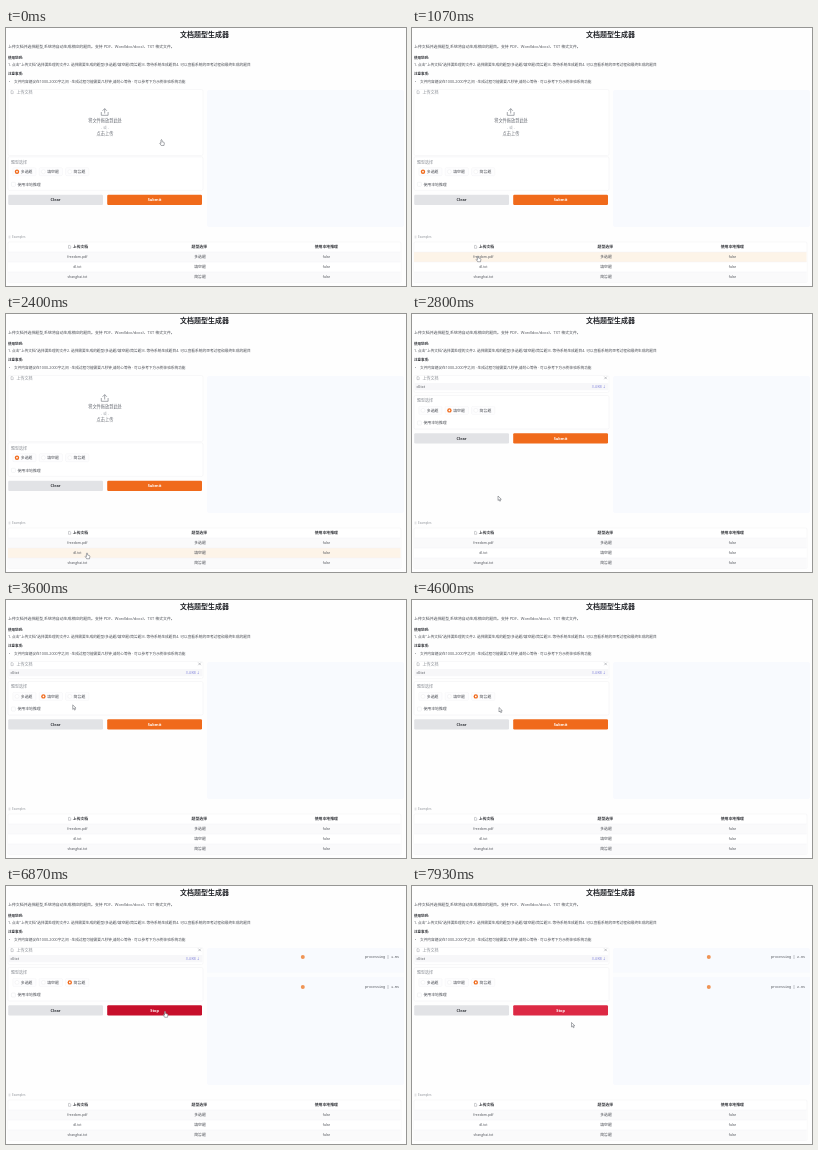
Recreate the animation shown at these times as an HTML page with a canvas. Size 400x258 px, loop 8 s.

```html
<!DOCTYPE html>
<html lang="zh-CN">
<head>
<meta charset="utf-8">
<title>文档题型生成器</title>
<style>
html, body { margin: 0; width: 100%; height: 100%; overflow: hidden; background: #fefefe; }
canvas { display: block; width: 400px; height: 258px; }
</style>
</head>
<body>
<canvas id="stage"></canvas>
<script>
const W = 400, H = 258, LOOP = 8000;
const LOADED = 2600, PICKED = 3850, SUBMITTED = 5300, TIMER = 5370;
const SANS = '"Open Sans", "Noto Sans CJK SC", "Noto Sans CJK", sans-serif';
const MONO = '"Liberation Mono", "DejaVu Sans Mono", monospace';
const INK = '#34363b', BODY = '#4c4f56', GREY = '#8b8f96', ORANGE = '#f06a1b';
const TYPES = ['多选题', '填空题', '简答题'];
const FILES = ['freedom.pdf', 'dl.txt', 'shanghai.txt'];

// Pointer tip: time, x, y
const PATH = [
  [0, 155.5, 111.7], [220, 155.5, 111.7], [900, 67, 223], [1070, 66, 228],
  [1550, 66, 228], [1830, 76, 236], [2100, 81, 239], [2650, 81, 239],
  [2800, 86, 182], [3250, 86, 182], [3700, 64, 94], [4150, 64, 94],
  [4600, 87, 107.5], [4750, 87, 107.5], [5170, 159, 125.5],
  [7150, 159, 125.5], [7550, 159.5, 136.5], [LOOP, 159.5, 136.5]
];

const canvas = document.getElementById('stage');
const ctx = canvas.getContext('2d');
const dpr = window.devicePixelRatio || 1;
canvas.width = Math.round(W * dpr);
canvas.height = Math.round(H * dpr);

function box(x, y, w, h, fill, radius = 0, stroke) {
  ctx.beginPath();
  ctx.roundRect(x, y, w, h, radius);
  if (fill) { ctx.fillStyle = fill; ctx.fill(); }
  if (stroke) { ctx.strokeStyle = stroke; ctx.lineWidth = 0.5; ctx.stroke(); }
}

function text(str, x, y, { size = 3.9, color = BODY, bold = false, align = 'left', family = SANS } = {}) {
  ctx.font = `${bold ? 'bold ' : ''}${size}px ${family}`;
  ctx.fillStyle = color;
  ctx.textAlign = align;
  ctx.textBaseline = 'alphabetic';
  ctx.fillText(str, x, y + size * 0.37);
}

function line(points, color, width) {
  ctx.beginPath();
  points.forEach(([x, y], i) => i ? ctx.lineTo(x, y) : ctx.moveTo(x, y));
  ctx.strokeStyle = color;
  ctx.lineWidth = width;
  ctx.stroke();
}

function disc(x, y, r, fill, stroke) {
  ctx.beginPath();
  ctx.arc(x, y, r, 0, Math.PI * 2);
  ctx.fillStyle = fill;
  ctx.fill();
  if (stroke) { ctx.strokeStyle = stroke; ctx.lineWidth = 0.4; ctx.stroke(); }
}

function pointerAt(t) {
  const i = Math.max(1, PATH.findIndex(p => p[0] > t));
  const [t0, x0, y0] = PATH[i - 1], [t1, x1, y1] = PATH[i];
  const k = (t - t0) / (t1 - t0), e = k * k * (3 - 2 * k);
  return { x: x0 + (x1 - x0) * e, y: y0 + (y1 - y0) * e };
}

const inside = (p, x, y, w, h) => p.x >= x && p.x < x + w && p.y >= y && p.y < y + h;

function drawIntro() {
  const head = { size: 3.5, bold: true, color: INK };
  text('文档题型生成器', 198.5, 6.6, { size: 7, bold: true, align: 'center', color: '#222429' });
  text('上传文档并选择题型,系统将自动生成相应的题目。支持 PDF、Word(doc/docx)、TXT 格式文件。', 2, 18.6, { size: 3.92 });
  text('使用说明:', 2, 29.3, head);
  text('1. 点击"上传文档"选择要处理的文件2. 选择需要生成的题型(多选题/填空题/简答题)3. 等待系统生成题目4. 可以查看系统的思考过程和最终生成的题目', 2, 36.5, { size: 3.71 });
  text('注意事项:', 2, 45.4, head);
  disc(3.4, 53.4, 0.45, BODY);
  text('文件内容建议在1000-2000字之间 · 生成过程可能需要几秒钟,请耐心等待 · 可以参考下方示例体验系统功能', 8, 53.4, { size: 3.68 });
}

function fileIcon(x, y) {
  line([[x, y - 1.4], [x + 1.6, y - 1.4], [x + 2.2, y - 0.7], [x + 2.2, y + 1.5], [x, y + 1.5], [x, y - 1.4]], GREY, 0.4);
}

function drawUpload(loaded) {
  box(2, 61.5, 195, loaded ? 17 : 66, '#ffffff', 1.5, '#f1f1f3');
  fileIcon(5, 64.1);
  text('上传文档', 10.5, 64.1, { size: 4, color: GREY });
  if (loaded) {
    box(2.5, 69, 194, 7.3, '#f7f7f9');
    text('dl.txt', 4.5, 72.4, { size: 3.6 });
    text('3.4 KB ↓', 194, 72.4, { size: 3.4, color: '#7274d8', align: 'right' });
    line([[192.3, 62.6], [194.9, 65.2]], GREY, 0.5);
    line([[194.9, 62.6], [192.3, 65.2]], GREY, 0.5);
    return;
  }
  line([[95.3, 84], [95.3, 87.3], [102.1, 87.3], [102.1, 84]], '#6b6f77', 0.6);
  line([[98.7, 85.5], [98.7, 80.7]], '#6b6f77', 0.6);
  line([[96.5, 82.8], [98.7, 80.6], [100.9, 82.8]], '#6b6f77', 0.6);
  const hint = { size: 4.2, align: 'center', color: '#666a72' };
  text('将文件拖放到此处', 99, 92.6, hint);
  text('- 或 -', 99, 99.2, { ...hint, size: 3.6, color: '#a4a8ae' });
  text('点击上传', 99, 105.2, hint);
}

function drawOptions(y, selected) {
  box(2, y - 5.5, 195, 33.5, '#ffffff', 1.5, '#efeff1');
  text('题型选择', 5, y, { size: 4, color: GREY });
  TYPES.forEach((name, i) => {
    const x = 11 + i * 26.4, cy = y + 9.4;
    box(x - 4.2, cy - 4, 23.2, 8, '#fdfdfe', 1.2, '#f3f3f5');
    if (i === selected) {
      disc(x, cy, 2.2, ORANGE);
      disc(x, cy, 0.85, '#ffffff');
    } else {
      disc(x, cy, 2, '#ffffff', '#e8e9eb');
    }
    text(name, x + 3.8, cy, { size: 3.9 });
  });
  box(5.4, y + 20, 4, 4, '#ffffff', 0.8, '#e9eaec');
  text('使用本地推理', 11.4, y + 22, { size: 3.9 });
}

function button(x, y, label, fill, color) {
  box(x, y, 94.8, 10.2, fill, 1.2);
  text(label, x + 47.4, y + 5.1, { size: 3.9, bold: true, align: 'center', color });
}

function drawButtons(y, running, hover) {
  button(2.2, y, 'Clear', '#e2e3e6', INK);
  const idle = hover ? '#e8601a' : ORANGE;
  const stop = hover ? '#c70f2b' : '#dc2944';
  button(101.2, y, running ? 'Stop' : 'Submit', running ? stop : idle, '#ffffff');
}

function drawOutput(t) {
  box(201, 62, 197, 137, '#f8fafe', 2);
  if (t < SUBMITTED) return;
  box(201, 86.5, 197, 4.5, '#fcfdfe');
  const seconds = Math.max(0, (t - TIMER) / 1000).toFixed(1);
  for (const y of [71, 101]) {
    disc(296.8, y, 2, '#ef9455');
    text(`processing | ${seconds}s`, 393, y - 0.7, { size: 3.35, family: MONO, align: 'right', color: '#454850' });
  }
}

function drawExamples(hoverRow) {
  [-0.9, 0, 0.9].forEach(d => line([[2.6, 209 + d], [4.4, 209 + d]], '#a4a8ae', 0.3));
  text('Examples', 6, 209, { size: 3, color: GREY });
  box(2, 214, 393, 40.5, '#ffffff', 1.2, '#f1f1f3');
  const head = { size: 3.85, bold: true, align: 'center', color: INK };
  fileIcon(62.5, 218.8);
  text('上传文档', 74.5, 218.8, head);
  text('题型选择', 193.3, 218.8, head);
  text('使用本地推理', 320.3, 218.8, head);
  FILES.forEach((name, i) => {
    const y = 224 + i * 10, latin = { size: 3.45, align: 'center' };
    const tint = i === hoverRow ? '#fdf4e8' : i % 2 ? '#ffffff' : '#fafafb';
    box(2, y, 392.5, 10, tint);
    line([[2, y], [394.5, y]], '#f0f0f2', 0.4);
    text(name, 71.3, y + 5, latin);
    text(TYPES[i], 194, y + 5, { ...latin, size: 3.85 });
    text('false', 320.5, y + 5, latin);
  });
}

function drawPointer(p, hand) {
  ctx.save();
  ctx.translate(p.x, p.y);
  ctx.scale(0.9, 0.9);
  ctx.lineJoin = 'round';
  ctx.beginPath();
  const shape = hand
    ? [[-0.6, 0.3], [0, -0.2], [0.6, 0.3], [0.7, 2.3], [2.8, 2.9], [3.2, 3.6], [2.8, 6.4], [-0.4, 6.4], [-2, 3.9], [-1.5, 3.4], [-0.6, 4.2]]
    : [[0, 0], [0, 5], [1.2, 3.9], [2, 5.8], [2.9, 5.4], [2.1, 3.6], [3.7, 3.6]];
  shape.forEach(([x, y]) => ctx.lineTo(x, y));
  ctx.closePath();
  ctx.fillStyle = '#ffffff';
  ctx.fill();
  ctx.strokeStyle = '#62656c';
  ctx.lineWidth = 0.6;
  ctx.stroke();
  ctx.restore();
}

function draw(t) {
  const loaded = t >= LOADED, running = t >= SUBMITTED;
  const selected = t >= PICKED ? 2 : loaded ? 1 : 0;
  const optionsY = loaded ? 87 : 134.3;
  const buttonY = loaded ? 119.2 : 166.7;
  const p = pointerAt(t);
  const row = inside(p, 2, 224, 393, 30) ? Math.floor((p.y - 224) / 10) : -1;
  const onButton = inside(p, 101, buttonY, 95, 10.2);
  const onUpload = !loaded && inside(p, 2, 62, 195, 65);
  const onRadio = inside(p, 7, optionsY + 5, 76, 9);

  ctx.setTransform(dpr, 0, 0, dpr, 0, 0);
  box(0, 0, W, H, '#fefefe');
  drawIntro();
  drawUpload(loaded);
  drawOptions(optionsY, selected);
  drawButtons(buttonY, running, onButton);
  drawOutput(t);
  drawExamples(row);
  drawPointer(p, row >= 0 || onButton || onUpload || onRadio);
}

function tick() {
  draw(performance.now() % LOOP);
  requestAnimationFrame(tick);
}
tick();
</script>
</body>
</html>
```
